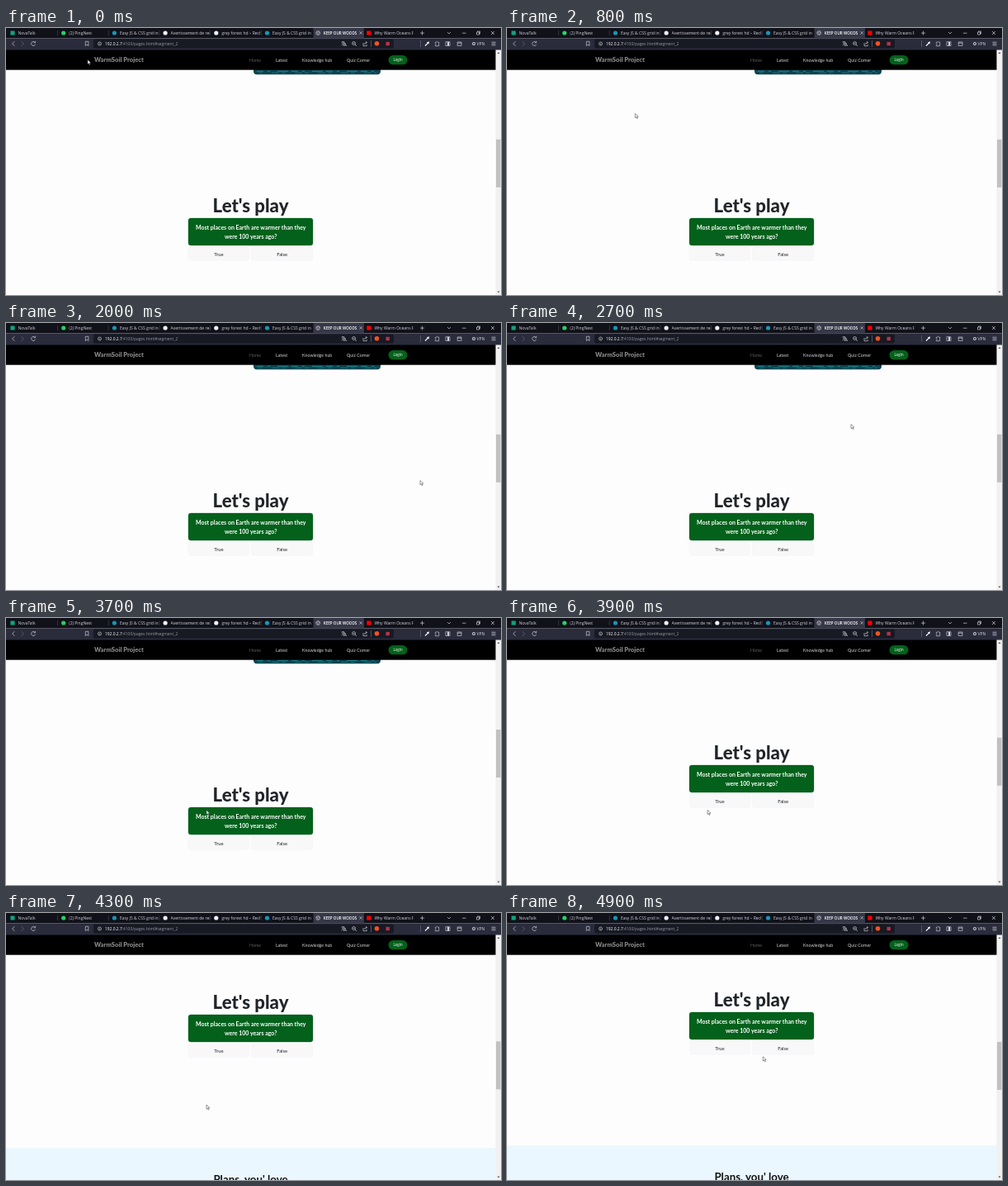
These frames come from a looping animation (600x323 px, 5 s). An HTML page:

```html
<!DOCTYPE html>
<html lang="en">
<head>
<meta charset="utf-8">
<title>Quiz page</title>
<style>
  html, body { margin: 0; width: 100%; height: 100%; overflow: hidden; background: #fdfdfe; }
  #stage { display: block; width: 100vw; height: 100vh; }
  text { font-family: Lato, sans-serif; }
  .ui text { font: 5px "Open Sans", sans-serif; fill: #d4d5dc; }
  .ui .active { font-size: 4.6px; font-weight: 600; fill: #fff; }
  .ui .url { font-size: 4.9px; fill: #9698a6; }
  .url tspan { fill: #fff; }
  .icon { fill: none; stroke: #c9cad3; stroke-width: .7; }
  .dim { stroke: #676a7d; }
  .nav { font-size: 5.3px; fill: #d2d2d2; }
  .mid { text-anchor: middle; }
</style>
</head>
<body>
<svg id="stage" viewBox="0 0 600 323" preserveAspectRatio="none">
  <rect width="600" height="323" fill="#fdfdfe"/>
  <g id="page">
    <rect x="300" y="20" width="154" height="36.3" rx="4" fill="#0d4450"/>
    <g fill="none" stroke="#1f8a92">
      <path d="M304 52.3h147" stroke-dasharray="8 5 3 9 13 4"/>
      <path d="M306 54.4h143" stroke-dasharray="5 11 9 3" opacity=".6"/>
    </g>
    <g class="mid">
      <text x="296.5" y="223" font-size="22.2" font-weight="800" fill="#212529">Let's play</text>
      <rect x="221" y="230" width="151" height="33" rx="3" fill="#03611b" stroke="#03611b" stroke-width=".7" stroke-opacity=".4"/>
      <g font-size="7" font-weight="700" fill="#fff">
        <text x="296.7" y="243.8">Most places on Earth are warmer than they</text>
        <text x="296.7" y="254.6">were 100 years ago?</text>
      </g>
      <g fill="#f8f8f9" stroke="#f2f2f4" stroke-width=".5">
        <rect x="221.2" y="265.2" width="73.5" height="16" rx="3"/>
        <rect x="297.2" y="265.2" width="74.6" height="16" rx="3"/>
      </g>
      <g font-size="5.9" fill="#212529">
        <text x="258" y="276">True</text>
        <text x="334.7" y="276">False</text>
      </g>
      <rect y="391.4" width="594" height="200" fill="#eaf7fe"/>
      <text x="296.5" y="433.5" font-size="13.3" font-weight="700" fill="#111">Plans, you' love</text>
    </g>
  </g>

  <rect x="593.5" y="26" width="6.5" height="297" fill="#f1f1f1"/>
  <rect id="thumb" x="594" y="134.8" width="5.5" height="58" fill="#c1c1c1"/>
  <path d="M595.5 31l1.5-2 1.5 2zM595.5 318.5l1.5 2 1.5-2z" fill="#555"/>

  <rect y="26" width="593.5" height="24.7" fill="#000"/>
  <text x="107" y="41.2" font-size="7.6" font-weight="900" fill="#858585">WarmSoil Project</text>
  <g class="nav">
    <text x="295" y="40.5" fill="#5c5c5c">Home</text>
    <text x="327" y="40.5">Latest</text>
    <text x="359" y="40.5">Knowledge hub</text>
    <text x="413" y="40.5">Quiz Corner</text>
  </g>
  <rect x="463.5" y="33" width="23" height="11.3" rx="5.6" fill="#03611b"/>
  <text class="mid" x="475" y="40.3" font-size="4.7" fill="#e6eee8">Login</text>

  <g class="ui">
    <rect width="600" height="12.5" fill="#11111a"/>
    <rect y="12.5" width="600" height="14" fill="#2a2c3c"/>
    <rect x="372.5" width="61.5" height="12.5" fill="#363848"/>
    <rect x="106" y="13.5" width="364" height="11" rx="2" fill="#171923"/>
    <g id="tabs"></g>
    <text class="url" x="120" y="20.9"><tspan>192.0.2.7</tspan>:4100/pages.html#segment_2</text>
    <text x="570.5" y="20.8">VPN</text>

    <g class="icon">
      <!-- window controls -->
      <path d="M428.5 4.2l3.4 3.4m0-3.4l-3.4 3.4M504.5 3.6v5m-2.5-2.5h5M535 5l2 2 2-2M553 6.2h4.5M570.5 5h3v3h-3zM571.5 5v-1h3v3h-1M588 4l4 4m0-4l-4 4"/>
      <!-- navigation -->
      <path d="M10.5 16.3l-3 2.7 3 2.7"/>
      <path class="dim" d="M18.5 16.3l3 2.7-3 2.7"/>
      <path d="M35 17.3a2.5 2.5 0 1 0 .5 2.5M35.6 15.8v2h-2M96.3 16.3h3.6v5.2l-1.8-1.4-1.8 1.4z"/>
      <!-- address field -->
      <circle cx="113.5" cy="19" r="2"/>
      <path d="M113.5 18.6v1.4M406.5 17h4m-2-1v1m1.5 0q-.8 2.8-3.3 3.8m.6-2.6l2 1.8m-.3 2l1.8-4 1.8 4m-3-1h2.4"/>
      <circle cx="421.6" cy="18.5" r="2"/>
      <path d="M423 20l2 2M420.6 18.5h2M433 18v3.7h4.2v-1.8M434.5 19.8q.2-2.3 3-2.3m-1.3-1.3l1.4 1.3-1.4 1.3"/>
      <path class="dim" d="M442.5 15v8M502.5 15v8"/>
      <!-- toolbar -->
      <path stroke="#fff" stroke-width="1.2" d="M508 21.5l3.2-3.2m-.7-1.2l2 2m-.9-1.2l1.2-1.2"/>
      <path d="M520.4 17.2h1.3q.8-1.7 1.6 0h1.4v4.5h-4.3v-1.4q1.4-.7 0-1.5zM533 16.7h5v4.8h-5zM547.2 17h4.8v4.4h-4.8zM547.2 18.2h4.8"/>
      <path stroke="#fff" stroke-width="1.6" d="M536 17v4.2"/>
      <circle cx="567" cy="19" r="1.5" stroke-width="1.1"/>
      <path d="M588.5 17.2h5m-5 1.8h5m-5 1.8h5"/>
    </g>
    <circle cx="449.5" cy="18.8" r="2.8" fill="#f4511f"/>
    <rect x="460.5" y="16.8" width="4.4" height="4.4" fill="#b8324a"/>
  </g>

  <path id="cursor" d="M0 0v5.2l1.3-1.1.9 2 .9-.4-.9-2h1.7z" fill="#fff" stroke="#333" stroke-width=".5"/>
</svg>

<script>
const LOOP = 5000, STEP = 100;
const byId = id => document.getElementById(id);

// title, icon colour, icon is square
const tabs = [
  ["NovaTalk", "#10a37f", true],
  ["(2) PingNest", "#25d366"],
  ["Easy JS & CSS grid in one", "#1597b8"],
  ["Avertissement de redirection", "#eef1f6"],
  ["grey forest hd – Recherche", "#eef1f6"],
  ["Easy JS & CSS grid in one", "#1597b8"],
  ["KEEP OUR WOODS", "#c9cad3"],
  ["Why Warm Oceans Rise Up", "#f00", true]
];

byId("tabs").innerHTML = tabs.map(([title, color, square], i) => {
  const x = i * 61.7, active = i === 6;
  const icon = active
    ? `<g class="icon"><circle cx="${x + 8}" cy="6" r="2.4"/><path d="M${x + 6} 5l2 1v2m0-4l2 2"/></g>`
    : `<rect x="${x + 5.4}" y="3.4" width="5.2" height="5.2" rx="${square ? .5 : 2.6}" fill="${color}"/>`;
  const line = i < 5 ? `<path class="dim" stroke-width=".4" d="M${x + 62.5} 3v6"/>` : "";
  return `${icon}${line}<svg x="${x + 14.5}" width="${active ? 42 : 47}" height="12">
    <text class="${active ? "active" : ""}" y="7.8">${title.replace("&", "&amp;")}</text></svg>`;
}).join("");

// time, x, y of the pointer tip
const path = [
  [0, 99, 38.5], [200, 99, 38.5], [800, 155.3, 103.5], [1300, 320, 158], [1400, 320, 158],
  [2000, 502, 190.5], [2100, 502, 190.5], [2700, 417, 122.5], [3600, 243, 232.5],
  [4400, 243, 232], [4900, 310.3, 173.8], [5000, 310.3, 173.8]
];

function pointerAt(t) {
  const i = path.findIndex(p => p[0] > t);
  const [t0, x0, y0] = path[i - 1], [t1, x1, y1] = path[i];
  const p = (t - t0) / (t1 - t0), e = p * p * (3 - 2 * p);
  return [x0 + (x1 - x0) * e, y0 + (y1 - y0) * e];
}

function scrollAt(t) {
  const p = Math.min(1, Math.max(0, (t - 3696) / 704));
  return Math.round(110 * (1 - (1 - p) ** 1.88));
}

function draw() {
  const t = Math.floor(performance.now() % LOOP / STEP) * STEP;
  const y = scrollAt(t);
  byId("page").setAttribute("transform", `translate(0 ${-y})`);
  byId("thumb").setAttribute("transform", `translate(0 ${y * .192})`);
  byId("cursor").setAttribute("transform", `translate(${pointerAt(t)})`);
  requestAnimationFrame(draw);
}
draw();
</script>
</body>
</html>
```
